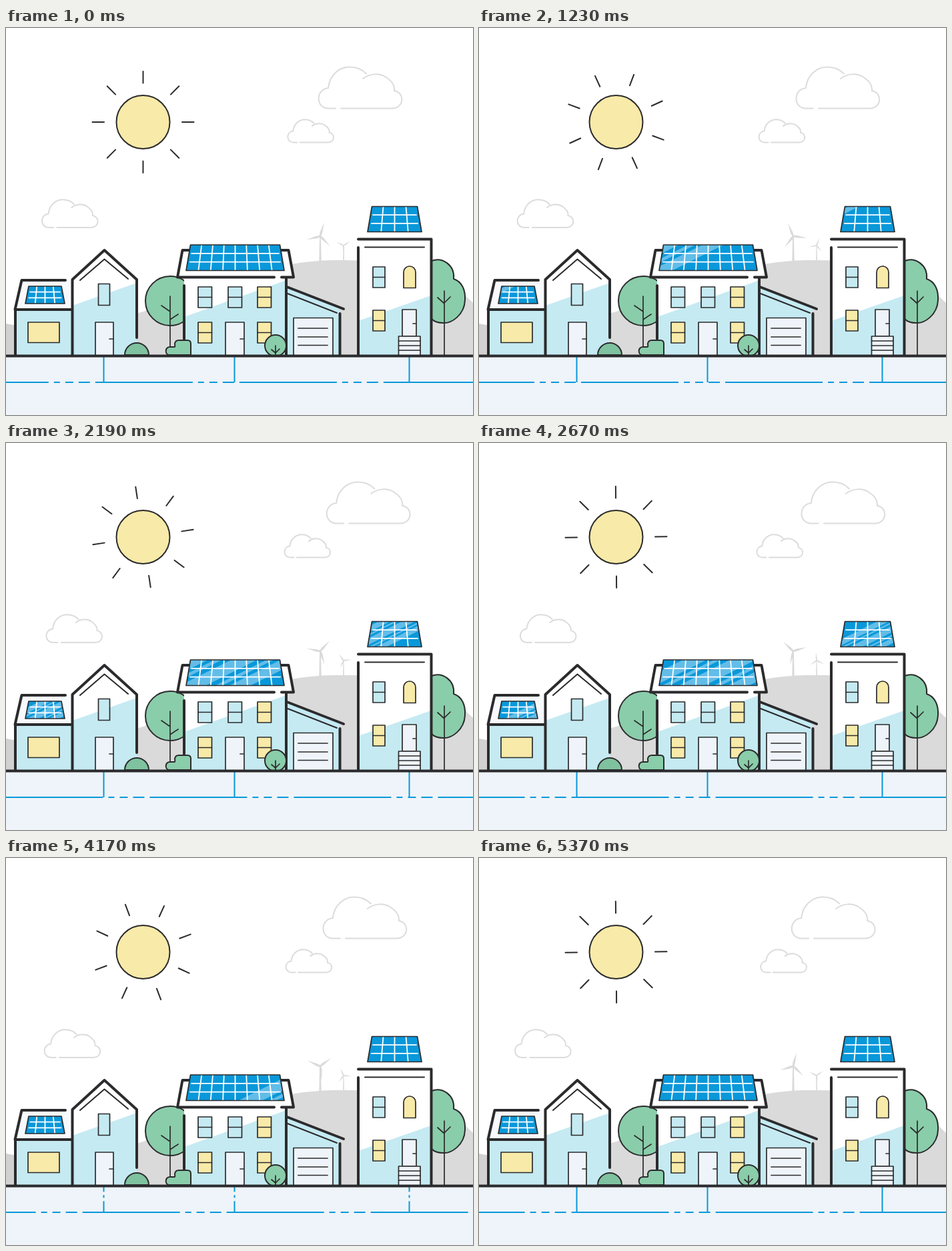
Write an HTML page that moves like this. It is 700 px wide and 580 px high and loops after 5.4 s.

```html
<!DOCTYPE html>
<html lang="en">
<head>
<meta charset="utf-8">
<title>Solar neighbourhood</title>
<style>
html, body { margin: 0; width: 100%; height: 100%; overflow: hidden; background: #fff; }
svg { display: block; width: 700px; height: 580px; }
.ink { stroke: #2b2b2d; stroke-width: 2; fill: none; stroke-linecap: round; stroke-linejoin: round; }
.bold { stroke-width: 4; }
.thin { stroke-width: 1.7; }
.sky { fill: #c5eaf2; }
.lit { fill: #f8eaa8; }
.pale { fill: #eef4f9; }
.leaf { fill: #8acdaa; }
.white { fill: #fff; }
.grey { fill: #dadada; }
.pipe { fill: none; stroke: #0998da; stroke-width: 2; }
.cloud { fill: none; stroke: #dcdcdc; stroke-width: 2; stroke-linecap: round; }
.cloud path { vector-effect: non-scaling-stroke; }
</style>
</head>
<body>
<svg id="stage" viewBox="0 0 700 580">
  <g id="clouds"></g>
  <g id="sun">
    <g id="rays" class="ink"></g>
    <circle class="ink lit" cx="205.5" cy="141" r="40"/>
  </g>

  <g id="turbines" class="grey"></g>
  <path class="grey" d="M150 438C260 420 360 350 490 348S660 372 700 412V491H150Z"/>
  <path fill="#d1d1d1" d="M0 443L16 446V491H0Z"/>
  <path class="pale" d="M0 491H700V580H0Z"/>

  <g id="pipes" class="pipe"></g>

  <g id="trees">
    <circle class="ink leaf" cx="246" cy="409" r="37"/>
    <path class="ink thin" d="M246 402V491M246 425L233 416M246 437L258 429"/>
    <path class="ink leaf" d="M638 349C654 343 673 355 671 376C683 380 689 392 688 408C687 430 668 443 655 442C648 442 642 440 638 436Z"/>
    <path class="ink thin" d="M657 394V491M657 413L647 404M657 412L666 403"/>
  </g>

  <g id="cottage">
    <path class="sky" d="M14 422H99V491H14Z"/>
    <path fill="#f7f9fc" d="M23 378H99V422H14Z"/>
    <path class="ink bold" d="M89 378H23.500L13.500 422H99M14 422V491"/>
    <rect class="ink lit thin" x="33" y="441" width="47" height="30.500"/>
  </g>

  <g id="gable">
    <path class="white" d="M99.500 377L147.500 333L196 377V491H99.500Z"/>
    <path class="sky" d="M99.500 416L196 382V491H99.500Z"/>
    <path class="ink bold" d="M99.500 491V377L147.500 333L196 377V464"/>
    <path class="ink" d="M111 378L147.500 346.500L183 376"/>
    <rect class="ink sky thin" x="138.500" y="383.500" width="17" height="32"/>
    <path class="ink pale thin" d="M134 491V441H161V491"/>
    <path class="ink thin" d="M155 466H161"/>
    <path class="ink" fill="#7fc29f" style="fill:#7fc29f" d="M178 490A18 18 0 0 1 214 490Z"/>
  </g>

  <g id="garage">
    <path class="sky" d="M421 389L500 420V491H421Z"/>
    <path class="ink bold" d="M421 388L506 421M500.500 428V491"/>
    <path class="ink" d="M422 398L496 427"/>
    <path class="ink pale thin" d="M431 491V434.500H490V491"/>
    <path class="ink thin" d="M438 450H482M438 463H482M438 475.500H482"/>
  </g>

  <g id="manor">
    <path class="white" d="M267 374H420V491H267ZM264 333H424L431 374H257Z"/>
    <path class="sky" d="M267 433L420 378V491H267Z"/>
    <path class="ink bold" d="M275 333H264.500L257 373.500H402M413 373.500H431L423.500 333H412M267 386V466M420 374V491"/>
    <path class="ink pale thin" d="M329 491V441H357V491"/>
    <path class="ink thin" d="M351 466H356"/>
  </g>

  <g id="tower">
    <path class="white" d="M528 316H637V491H528Z"/>
    <path class="sky" d="M528 439L637 401V491H528Z"/>
    <path class="ink bold" d="M528 316.500H637.500V491M528 329V491"/>
    <path class="ink" d="M538 328.500H627"/>
    <path class="ink lit thin" d="M596 389.500V366A9 9 0 0 1 614 366V389.500Z"/>
    <rect class="ink pale thin" x="594" y="422" width="21" height="40"/>
    <path class="ink thin" d="M610 443H614"/>
    <rect class="ink pale thin" x="588.500" y="462" width="32.500" height="29"/>
    <path class="ink thin" d="M588.500 469H621M588.500 476H621M588.500 483H621"/>
  </g>

  <g id="windows"></g>
  <g id="panels"></g>

  <path class="ink leaf" d="M244 490C238 489 238 478 246 478H252C254 478 253 475 253 473Q254 468 259 468H272Q277 468 277 473V490Z"/>
  <circle class="ink leaf" cx="404" cy="476" r="16"/>
  <path class="ink thin" d="M404 476V491M398 482L404 487L410 481"/>
  <path class="ink bold" d="M-3 491.500H703"/>
</svg>
<script>
const LOOP = 5400;
const FLOW = 0.16;   // px per ms along the pipes
const SWEEP = 0.08;  // px per ms of the panel glint
const byId = id => document.getElementById(id);

function add(parent, tag, attrs = {}) {
  const el = document.createElementNS('http://www.w3.org/2000/svg', tag);
  for (const key in attrs) el.setAttribute(key, attrs[key]);
  parent.appendChild(el);
  return el;
}

// Clouds share one outline, drawn from its left top corner.
const CLOUD = 'M26 62.500H14C-4 61 -4 34 15 32C17 12 32 0.500 47 0.500C59 0.500 67 5 72 10.500' +
  'M67 18C77 10 92 9 102 16C111 22 115 29 114 36C130 39 129 61 112 62.500H34';
const clouds = [
  { x: 468, y: 58, scale: 1, drift: 15 },
  { x: 422, y: 137, scale: 0.55, drift: -6 },
  { x: 53.5, y: 257, scale: 0.67, drift: 8 }
].map(cloud => {
  const el = add(byId('clouds'), 'g', { class: 'cloud' });
  add(el, 'path', { d: CLOUD });
  return { ...cloud, el };
});

for (let i = 0; i < 8; i++) {
  add(byId('rays'), 'path', { d: 'M0 -58.500V-76', transform: `rotate(${i * 45})` });
}

const turbines = [
  { x: 471, y: 312, size: 21, start: 17 },
  { x: 506, y: 326, size: 12, start: 60 }
].map(turbine => {
  const { x, y, size } = turbine;
  const group = byId('turbines');
  const half = size / 12;
  add(group, 'path', { d: `M${x - half / 2} ${y}H${x + half / 2}L${x + half} 352H${x - half}Z` });
  const el = add(group, 'g');
  for (let i = 0; i < 3; i++) {
    add(el, 'path', {
      d: `M-0.500 ${-size}L${size * 0.07} ${-size * 0.3}L${size * 0.06} 0H${-size * 0.06}L${-size * 0.1} ${-size * 0.25}Z`,
      transform: `rotate(${i * 120})`
    });
  }
  return { ...turbine, el };
});

const main = add(byId('pipes'), 'path', { d: 'M0 531H700', 'stroke-dasharray': '146 8 9 8 12 8 17 8' });
const drops = [146.5, 342.5, 604.5].map(x =>
  add(byId('pipes'), 'path', { d: `M${x} 492V531`, 'stroke-dasharray': '834 5 11 5 4 5' }));

function addWindow(x, y, width, fill) {
  const group = byId('windows');
  add(group, 'rect', { class: `ink thin ${fill}`, x, y, width, height: 31 });
  add(group, 'path', { class: 'ink thin', d: `M${x} ${y + 15.5}h${width}` });
}
[[288, 388, 'sky'], [333, 388, 'sky'], [377, 388, 'lit'], [288, 441, 'lit'], [377, 441, 'lit']]
  .forEach(([x, y, fill]) => addWindow(x, y, 20.5, fill));
addWindow(550, 358, 18, 'sky');
addWindow(550, 423, 18, 'lit');

// Glint bands as fractions of the whole glint, from its trailing edge.
const BANDS = [[0, 0.2], [0.26, 0.32], [0.4, 0.62], [0.7, 0.76], [0.82, 1]];

function makePanel({ left, right, top, bottom, slant, columns, glint, lead }, index) {
  const group = byId('panels');
  const height = bottom - top;
  const outline = `M${left + slant} ${top}H${right - slant}L${right} ${bottom}H${left}Z`;
  add(add(group, 'clipPath', { id: `panel${index}` }), 'path', { d: outline });
  add(group, 'path', { d: outline, fill: '#0998da' });
  const clipped = add(group, 'g', { 'clip-path': `url(#panel${index})` });
  const el = add(clipped, 'g', { fill: '#fff', 'fill-opacity': 0.36 });
  for (const [from, to] of BANDS) {
    const a = (from - 1) * glint, b = (to - 1) * glint;
    add(el, 'path', { d: `M${a} 0H${b}L${b - 2 * height} ${height}H${a - 2 * height}Z` });
  }
  let grid = '';
  for (let i = 1; i < columns; i++) {
    const f = i / columns;
    const upper = left + slant + (right - left - 2 * slant) * f;
    grid += `M${upper} ${top}L${left + (right - left) * f} ${bottom}`;
  }
  for (const f of [1 / 3, 2 / 3]) {
    const inset = slant * (1 - f) + 3;
    grid += `M${left + inset} ${top + height * f}H${right - inset}`;
  }
  add(clipped, 'path', { d: grid, stroke: '#fff', 'stroke-width': 1.8, fill: 'none' });
  add(group, 'path', { d: outline, class: 'ink thin' });
  return { el, top, lead };
}
const panels = [
  { left: 29, right: 88, top: 387, bottom: 413, slant: 5, columns: 4, glint: 80, lead: -44 },
  { left: 270, right: 417, top: 325, bottom: 363.5, slant: 6.5, columns: 8, glint: 176, lead: 268 },
  { left: 542, right: 623, top: 267.5, bottom: 305.5, slant: 6.5, columns: 4, glint: 88, lead: 471 }
].map(makePanel);

function draw(time) {
  const phase = time / LOOP;
  const sway = 1 - Math.abs(1 - 2 * phase);
  byId('rays').setAttribute('transform', `translate(205.500 141) rotate(${90 * phase})`);
  for (const { el, x, y, scale, drift } of clouds) {
    el.setAttribute('transform', `translate(${x + drift * sway} ${y}) scale(${scale})`);
  }
  for (const { el, x, y, start } of turbines) {
    el.setAttribute('transform', `translate(${x} ${y}) rotate(${start + 360 * phase})`);
  }
  for (const { el, top, lead } of panels) {
    el.setAttribute('transform', `translate(${lead + SWEEP * time} ${top})`);
  }
  main.setAttribute('stroke-dashoffset', 82 + FLOW * time);
  for (const drop of drops) drop.setAttribute('stroke-dashoffset', 842 - FLOW * (time - 4170));
}

const startTime = performance.now();
function tick() {
  draw((performance.now() - startTime) % LOOP);
  requestAnimationFrame(tick);
}
draw(0);
requestAnimationFrame(tick);
</script>
</body>
</html>
```
